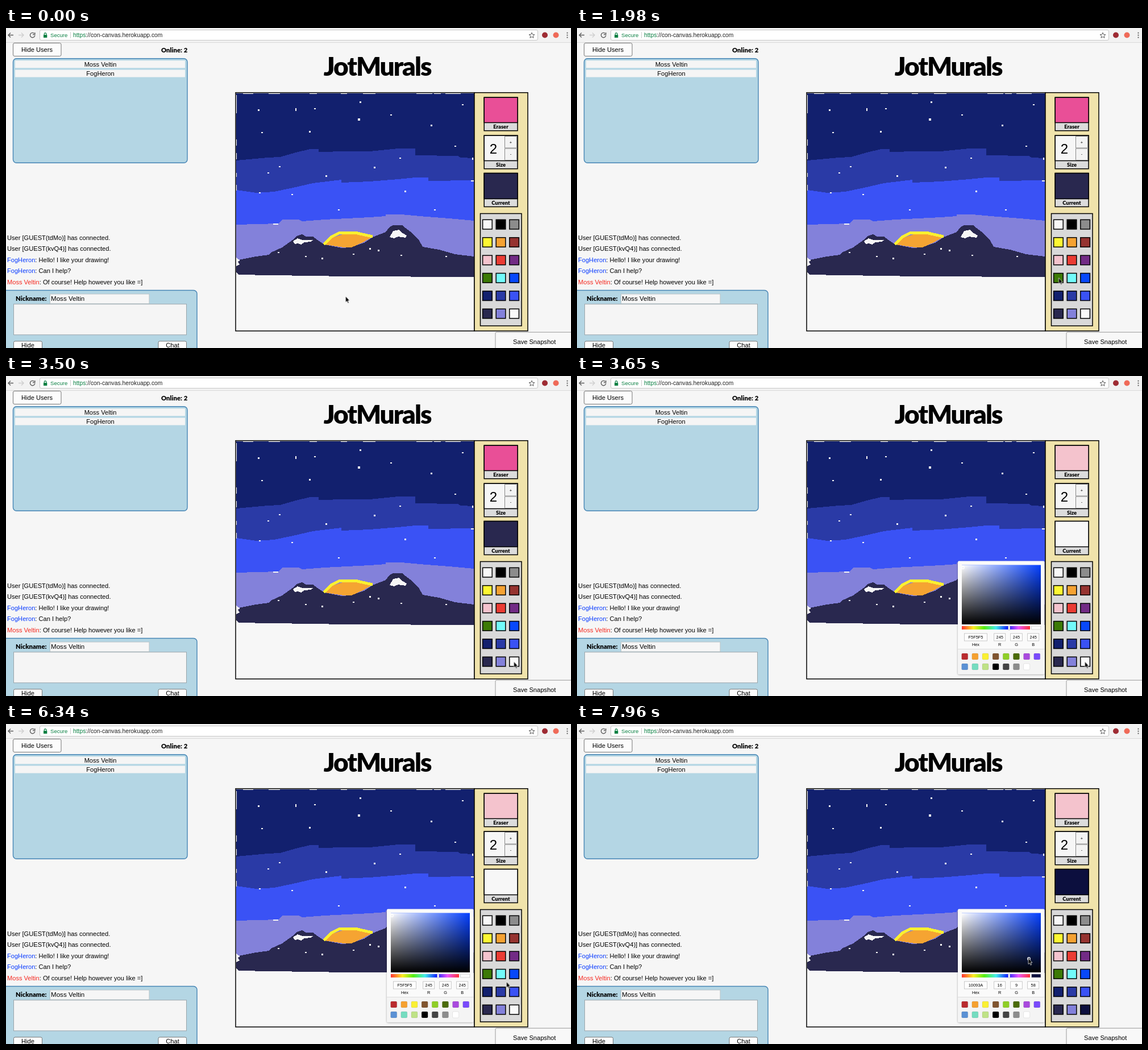
These frames come from a looping animation (994x563 px, 8 s). An HTML page:

```html
<!DOCTYPE html>
<html lang="en">
<head>
<meta charset="utf-8">
<title>Shared drawing board</title>
<style>
html, body { margin: 0; width: 100%; height: 100%; overflow: hidden; background: #f6f6f6; }
svg { display: block; width: 994px; height: 563px; }
text { font: 11.1px "Liberation Sans", Arial, sans-serif; white-space: pre; }
.bold { font: 900 11.3px Lato, sans-serif; }
.title { font: 900 46px Lato, sans-serif; letter-spacing: -2px; }
.label { font: 900 9.4px Lato, sans-serif; }
.mid { text-anchor: middle; }
.tiny { font-size: 7.4px; text-anchor: middle; }
.box { stroke: #000; stroke-width: 1.5; }
.button { fill: #fcfcfc; stroke: #777; }
.field { fill: #fff; stroke: #bbb; stroke-width: .8; }
#strokes { shape-rendering: crispEdges; }

.anim { animation: 8s step-end infinite; }
#cursor { animation-name: travel; }
#arrow { animation-name: arrow; }
#beam { animation-name: beam; }
#picker { animation-name: open; }
#eraser { animation-name: eraser; }
#current { animation-name: current; }
.picked { animation-name: picked; }
#readout { animation-name: readout; }
#ring { animation-name: ring; }

@keyframes open { 0% { opacity: 0 } 45.625%, 100% { opacity: 1 } }
@keyframes eraser { 0% { fill: #e94f97 } 45.625%, 100% { fill: #f4c3cd } }
@keyframes current { 0% { fill: #29284f } 45.625% { fill: #f7f7f7 } 92.25%, 100% { fill: #0c0f3e } }
@keyframes picked { 0% { fill: #fafafa } 92.25%, 100% { fill: #0c0f3e } }
@keyframes beam { 0% { opacity: 0 } 57.125% { opacity: 1 } 62.625%, 100% { opacity: 0 } }
@keyframes arrow { 0% { opacity: 1 } 57.125% { opacity: 0 } 62.625%, 100% { opacity: 1 } }
@keyframes ring {
  0% { transform: translate(679px, 337px) }
  92.25% { transform: translate(794px, 411px) }
  99.5%, 100% { transform: translate(795px, 413px) }
}
@keyframes readout {
  0% { transform: translateY(0) }
  92.25% { transform: translateY(-20px) }
  94.125% { transform: translateY(-40px) }
  95.875% { transform: translateY(-60px) }
  97.75% { transform: translateY(-80px) }
  99.5%, 100% { transform: translateY(-100px) }
}
@keyframes travel {
  0% { transform: translate(597.5px, 472px) }
  1.875% { transform: translate(597.5px, 473px) }
  11.625% { transform: translate(598px, 448px) }
  13.5% { transform: translate(597px, 418px) }
  17.25% { transform: translate(620px, 414px) }
  19.125% { transform: translate(700px, 414px) }
  21% { transform: translate(780px, 421px) }
  22.875% { transform: translate(835px, 432px) }
  24.75% { transform: translate(847.5px, 439.5px) }
  26.625% { transform: translate(855px, 452px) }
  28.5% { transform: translate(863px, 468px) }
  30.375% { transform: translate(882px, 488px) }
  32.25% { transform: translate(893.5px, 502.5px) }
  49.25% { transform: translate(845px, 474px) }
  51.5% { transform: translate(779px, 438px) }
  55.25% { transform: translate(772px, 437px) }
  57.125% { transform: translate(768px, 456px) }
  59% { transform: translate(767px, 458px) }
  60.875% { transform: translate(768px, 461px) }
  62.625% { transform: translate(768px, 468px) }
  64.5% { transform: translate(770px, 476px) }
  66.375% { transform: translate(771px, 484px) }
  68.125% { transform: translate(772px, 491px) }
  70% { transform: translate(778px, 496px) }
  71.875% { transform: translate(800px, 494px) }
  73.75% { transform: translate(828px, 484px) }
  75.625% { transform: translate(852px, 472px) }
  77.375% { transform: translate(872px, 462px) }
  79.25% { transform: translate(880.5px, 453.5px) }
  81.125% { transform: translate(862px, 453px) }
  82.875% { transform: translate(827px, 453px) }
  84.75% { transform: translate(793px, 410px) }
  99.5%, 100% { transform: translate(794px, 412px) }
}
</style>
</head>
<body>
<svg viewBox="0 0 994 563">
  <defs>
    <linearGradient id="whiten"><stop stop-color="#fff"/><stop offset="1" stop-color="#fff" stop-opacity="0"/></linearGradient>
    <linearGradient id="darken" x2="0" y2="1"><stop stop-opacity="0"/><stop offset="1"/></linearGradient>
    <linearGradient id="hues">
      <stop stop-color="#f33"/><stop offset=".17" stop-color="#fe2"/><stop offset=".33" stop-color="#5e1"/>
      <stop offset=".5" stop-color="#4ee"/><stop offset=".67" stop-color="#12f"/>
      <stop offset=".83" stop-color="#e5f"/><stop offset="1" stop-color="#f33"/>
    </linearGradient>
    <clipPath id="fieldRow"><rect x="670" y="452" width="152" height="15"/></clipPath>
    <filter id="shadow" x="-10%" y="-10%" width="120%" height="120%">
      <feDropShadow dx="0" dy="1" stdDeviation="1.5" flood-opacity=".35"/>
    </filter>
  </defs>
  <rect width="994" height="563" fill="#f6f6f6"/>

  <g id="toolbar">
    <rect width="994" height="25" fill="#f2f2f2"/>
    <path d="M0 25.5H994" stroke="#d9d9d9"/>
    <rect x="59.5" y="3.5" width="876" height="18" rx="2.5" fill="#fff" stroke="#c6c6c6"/>
    <g fill="none" stroke="#5f5f5f" stroke-width="1.4">
      <path d="M13 12.5H4M8 8.5L4 12.5L8 16.5"/>
      <path d="M22 12.5H31M27 8.5L31 12.5L27 16.5" stroke="#cfcfcf"/>
      <path d="M49.5 9.5A4.2 4.2 0 1 0 50.8 13M50.8 8V11.5H47"/>
      <path d="M925 8L926.4 11.4L930 11.6L927.2 13.9L928.1 17.4L925 15.5L921.9 17.4L922.8 13.9L920 11.6L923.6 11.4Z" stroke-width="1"/>
      <path d="M67.3 12V10.5A1.8 1.8 0 0 1 70.9 10.5V12" stroke="#0b8043" stroke-width="1.2"/>
    </g>
    <rect x="66" y="12" width="6.3" height="5" fill="#0b8043"/>
    <text x="78" y="16.3" fill="#0b8043" style="font-size:9.6px">Secure</text>
    <path d="M113.5 7V18" stroke="#ccc"/>
    <text x="118" y="16.3" fill="#222" style="font-size:10.3px"><tspan fill="#0b8043">https</tspan>://con-canvas.herokuapp.com</text>
    <circle cx="948" cy="12.5" r="5" fill="#9e2b33"/>
    <circle cx="967.5" cy="12.5" r="5" fill="#ef6a58"/>
    <g fill="#5f5f5f"><circle cx="987.5" cy="8.7" r="1.1"/><circle cx="987.5" cy="12.7" r="1.1"/><circle cx="987.5" cy="16.7" r="1.1"/></g>
  </g>

  <g id="users">
    <rect class="button" x="12.5" y="26.5" width="84.5" height="23" rx="2.5"/>
    <text class="mid" x="54.5" y="42">Hide Users</text>
    <text class="bold" x="273" y="43">Online: 2</text>
    <rect x="12.5" y="53.7" width="306.5" height="183.5" rx="6" fill="#b4d6e4" stroke="#4786b5" stroke-width="1.4"/>
    <path d="M16 63.7H315M16 80H315" stroke="#f5f5f5" stroke-width="13"/>
    <text class="mid" x="166" y="67.5">Moss Veltin</text>
    <text class="mid" x="166" y="83.5">FogHeron</text>
  </g>

  <g id="chat">
    <text x="2" y="372.8">User [GUEST(tdMo)] has connected.</text>
    <text x="2" y="392.2">User [GUEST(kvQ4)] has connected.</text>
    <text x="2" y="411.7"><tspan fill="#0a3cff">FogHeron</tspan>: Hello! I like your drawing!</text>
    <text x="2" y="431.2"><tspan fill="#0a3cff">FogHeron</tspan>: Can I help?</text>
    <text x="2" y="450.7"><tspan fill="#f5281f">Moss Veltin</tspan>: Of course! Help however you like =]</text>
    <rect x="-10" y="461.5" width="346" height="120" rx="6" fill="#b4d6e4" stroke="#4786b5" stroke-width="1.4"/>
    <text class="bold" x="17" y="480">Nickname:</text>
    <rect x="77.5" y="468" width="174.5" height="17" fill="#f6f6f6" stroke="#b9c4c8"/>
    <text x="79" y="480.2" style="font-size:11.6px">Moss Veltin</text>
    <rect x="13.5" y="485.8" width="304" height="54" fill="#f5f5f5" stroke="#9aa5aa"/>
    <rect class="button" x="13.5" y="551" width="50" height="20" rx="2.5"/>
    <rect class="button" x="268" y="551" width="49.5" height="20" rx="2.5"/>
    <text class="mid" x="38.5" y="562">Hide</text>
    <text class="mid" x="293" y="562">Chat</text>
  </g>

  <text class="title mid" x="653" y="84">JotMurals</text>

  <g id="painting">
    <rect x="404" y="113.7" width="420" height="419.3" fill="#f7f7f7"/>
    <g id="strokes">
      <path fill="#12206e" d="M405 115H823V240H405Z"/>
      <path fill="#2a3aa6" d="M405 233L460 228L482 227L510 219L535 213H550V218L600 217L640 217L690 212H720V224L795 225L800 228L823 229V300H405Z"/>
      <path fill="#3a52f5" d="M405 285L440 290L472 288L505 281L540 273L590 267V272L640 270L690 266L720 263H743V269L823 268V350H405Z"/>
      <path fill="#8381da" d="M405 346L479 344L486 337H515L521 340L560 337L600 335L640 333L668 331V328H695L740 332L780 335L823 339V410H405Z"/>
      <path fill="#29284f" d="M405 404L409 408L440 402L463 399L466 395L486 386L504 373L511 366L521 363L528 367H540L548 373L560 381L590 387L605 386L630 378L645 368L668 359L675 350L681 347H697L703 352L715 361L727 374L733 385L762 390L790 398L823 402V438L600 437L405 434Z"/>
      <path fill="#f6f6f6" d="M505 375L513 370L521 373H541L536 376L525 377L519 381L514 379L508 380ZM675 368L681 357L691 355L698 361L705 365L703 369L690 367L683 370ZM405 404L412 409L408 411L411 416L405 419ZM405 430L410 435H405Z"/>
      <path fill="#f5a432" d="M560 381L574 369L592 363L620 361L644 368L628 377L608 386H594L574 383Z"/>
      <path fill="none" stroke="#fbf030" stroke-width="5" stroke-linejoin="round" d="M559 381L572 368L585 361L616 360.5L645 367"/>
      <path fill="none" stroke="#f6f6f6" stroke-width="1.5" d="M417 115.3H435M462 115.3H482M534 115.3H547M589 115.3H600M628 115.3H650M722 115.3H750M753 115.3H765M773 115.3H800M405.5 118V150M405.5 196V207M405.5 220V231M405.5 255V262M405.5 276V286M470 345H479M818 269H823M821 228V232"/>
      <g id="stars" fill="#f6f6f6"></g>
    </g>
    <rect x="404" y="113.7" width="420" height="419.3" fill="none" stroke="#000" stroke-width="1.5"/>
  </g>

  <g id="tools">
    <rect x="824" y="113.7" width="94" height="419.3" fill="#f0e3ab" stroke="#000" stroke-width="1.5"/>
    <rect class="box" x="841.2" y="122.2" width="58.8" height="58.5" fill="#dcdcdc"/>
    <rect class="box anim" id="eraser" x="841.2" y="122.2" width="58.8" height="44.3"/>
    <rect class="box" x="841.2" y="189.2" width="58.8" height="58.5" fill="#dcdcdc"/>
    <rect class="box" x="841.2" y="189.2" width="58.8" height="44.3" fill="#f6f6f6"/>
    <path d="M877.5 190.5H898.5V211H877.5ZM877.5 212H898.5V232.5H877.5Z" fill="#f3f3f3" stroke="#888"/>
    <text x="850.7" y="221" style="font-size:24px">2</text>
    <text class="tiny" x="888" y="203.5">+</text>
    <text class="tiny" x="888" y="224">-</text>
    <rect class="box" x="841.2" y="255.5" width="58.8" height="59" fill="#dcdcdc"/>
    <rect class="box anim" id="current" x="841.2" y="255.5" width="58.8" height="45"/>
    <text class="label mid" x="870.5" y="177">Eraser</text>
    <text class="label mid" x="870.5" y="243.7">Size</text>
    <text class="label mid" x="870.5" y="310.8">Current</text>
    <rect x="834.5" y="326.5" width="72.5" height="197.5" fill="#d9d9d9" stroke="#000" stroke-width="1.5"/>
    <g id="swatches"></g>
  </g>

  <rect x="861" y="535.2" width="140" height="40" rx="2" fill="#f8f8f8" stroke="#999"/>
  <text class="mid" x="929.7" y="555.5">Save Snapshot</text>

  <g id="picker" class="anim">
    <rect x="670" y="325.5" width="152.5" height="199" rx="2" fill="#fafafa" filter="url(#shadow)"/>
    <path d="M670 480.5H822.5V522.5Q822.5 524.5 820.5 524.5H672Q670 524.5 670 522.5Z" fill="#f4f4f4"/>
    <path d="M670 480.5H822.5" stroke="#ddd"/>
    <g id="shade">
      <rect x="677" y="332.5" width="139" height="104.5" fill="#0540ff"/>
      <rect x="677" y="332.5" width="139" height="104.5" fill="url(#whiten)"/>
      <rect x="677" y="332.5" width="139" height="104.5" fill="url(#darken)"/>
    </g>
    <rect x="677" y="440" width="120" height="6" fill="url(#hues)"/>
    <rect x="758.7" y="439" width="3" height="8" rx="1" fill="#fff" stroke="#999" stroke-width=".5"/>
    <rect class="anim picked" x="799.7" y="440" width="16.3" height="6" stroke="#bbb" stroke-width=".6"/>
    <g id="fields"></g>
    <g clip-path="url(#fieldRow)"><g id="readout" class="anim"></g></g>
    <g id="presets"></g>
    <circle id="ring" class="anim" r="2.3" fill="none" stroke="#fff" stroke-width="1.2"/>
  </g>

  <g id="cursor" class="anim">
    <path id="arrow" class="anim" d="M0 0V10.5L2.4 8.4L4 12.2L5.7 11.4L4.1 7.8H7Z" fill="#000" stroke="#fff" stroke-width=".7"/>
    <path id="beam" class="anim" d="M-2-5.5Q0-5.5 0-4Q0-5.5 2-5.5M0-4V4M-2 5.5Q0 5.5 0 4Q0 5.5 2 5.5M-1.3 1.5H1.3" fill="none" stroke="#111"/>
  </g>
</svg>
<script>
const fill = (id, items, draw) => {
  document.getElementById(id).innerHTML = items.map(draw).join('');
};

const stars = '444,144 510,143 543,142 623,130 621,161 677,153 748,171 803,135 450,184 534,182 790,208 693,229 648,245 461,255 481,244 563,260 446,290 503,293 702,287 585,320 754,320 640,388 527,402 611,398 655,391 695,400 774,402 556,405 479,395';
fill('stars', stars.split(' '), (point, i) => {
  const [x, y] = point.split(',');
  const [w, h] = i === 1 ? [1.3, 5] : i === 4 ? [4, 4] : [3, i % 3 ? 2 : 3];
  return `<rect x="${x - w / 2}" y="${y - h / 2}" width="${w}" height="${h}"/>`;
});

const palette = '#f8f8f8 #000 #8c8c8c #fdf733 #f5a232 #963330 #f4c3cd #ea3c34 #722b85 #3c7a06 #72fafa #0848fa #12206e #2a3aa6 #3a52f5 #29284f #8381da #fafafa';
fill('swatches', palette.split(' '), (color, i, all) => {
  const x = 838.6 + i % 3 * 23.6, y = 337.3 + Math.floor(i / 3) * 31.4;
  const live = i === all.length - 1 ? 'anim picked' : '';
  return `<rect class="${live}" x="${x}" y="${y}" width="16.6" height="16.6" fill="${color}" stroke="#000" stroke-width="1.5"/>`;
});

const fields = [['Hex', 701.5, 40], ['R', 743.7, 20], ['G', 773, 20.5], ['B', 802.7, 20]];
fill('fields', fields, ([name, x, w]) =>
  `<rect class="field" x="${x - w / 2}" y="453" width="${w}" height="13"/>
   <text class="tiny" x="${x}" y="475">${name}</text>`);

const values = ['F5F5F5', '130A3F', '120A3E', '120A3D', '11093B', '10093A'];
fill('readout', values, (hex, row) => {
  const channels = hex.match(/../g).map(pair => parseInt(pair, 16));
  return [hex, ...channels].map((value, i) =>
    `<text class="tiny" x="${fields[i][1]}" y="${462.3 + row * 20}">${value}</text>`).join('');
});

const presets = '#b92b2f #f5a130 #faf034 #80552f #8fce27 #4b6b08 #a94ade #7a4bfb #5b91d4 #75dcc0 #bfe287 #000 #444 #8c8c8c #fff';
fill('presets', presets.split(' '), (color, i) =>
  `<rect x="${676.7 + i % 8 * 18.15}" y="${i < 8 ? 488 : 506}" width="11" height="11" rx="1.8" fill="${color}" stroke="#000" stroke-opacity=".15" stroke-width=".6"/>`);
</script>
</body>
</html>
```
